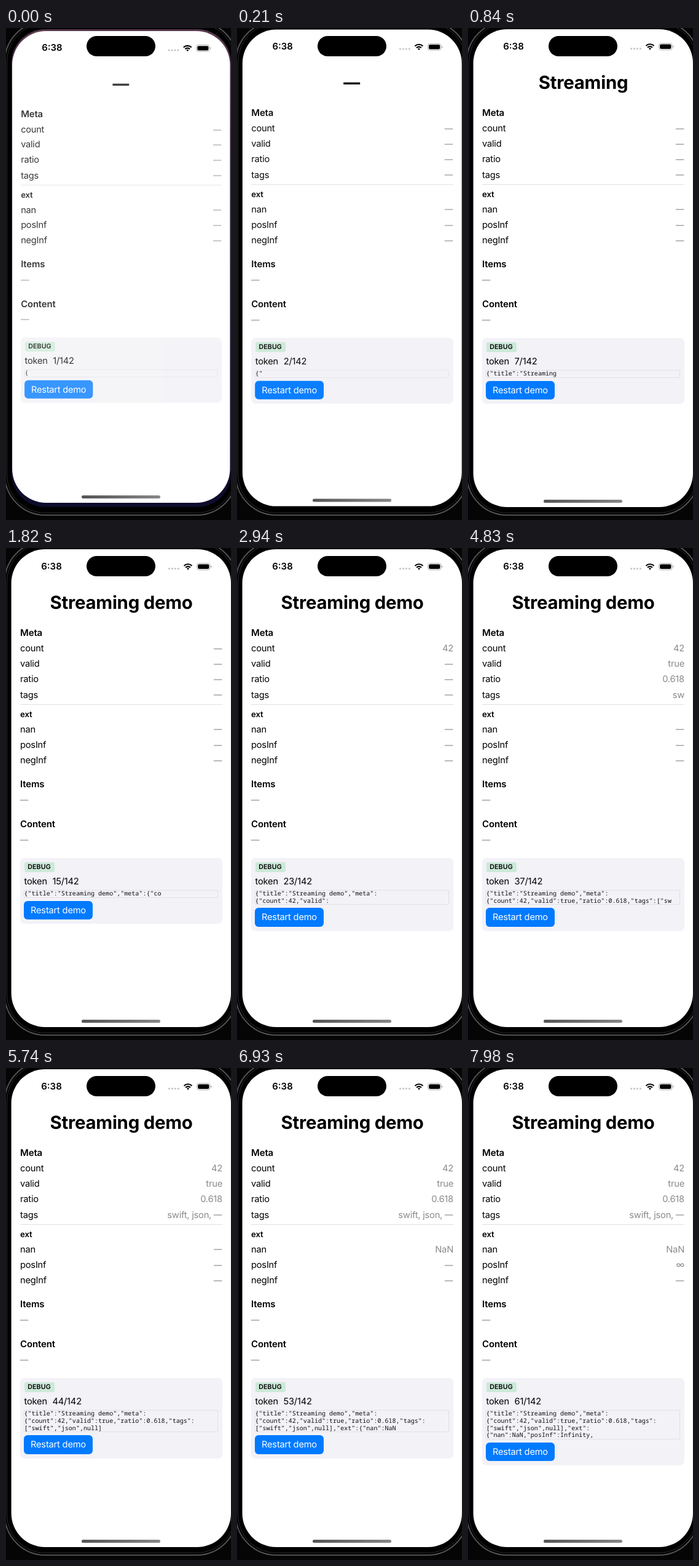
These frames come from a looping animation (366 px wide and 800 px high, 8000 ms). An HTML page:

```html
<!DOCTYPE html>
<html lang="en">
<head>
<meta charset="utf-8">
<title>Streaming demo</title>
<style>
  html, body { margin: 0; width: 100%; height: 100%; overflow: hidden; background: #050505; }
  #stage {
    --k: 1;
    position: relative; width: 366px; height: 800px; overflow: hidden;
    font: 14.7px/20px Inter, Roboto, sans-serif; letter-spacing: -.22px;
    color: #000; white-space: pre; text-rendering: geometricPrecision;
  }
  #stage div { position: absolute; box-sizing: border-box; }
  .body { left: -3px; top: -12px; width: 380px; height: 805px; border-radius: 67px; background: #000; border: 2px solid #505052; }
  .rim { left: 1px; top: -8px; width: 372px; height: 797px; border-radius: 63px; border: 1px solid #2c2c2e; }
  .wall { left: 8.6px; top: 2px; width: 357.3px; height: 777px; border-radius: 55px;
    background: linear-gradient(#5a3a50, #2a2038 30%, #0e0c2c); opacity: var(--k); }
  .win {
    inset: 0; background: #fff;
    clip-path: inset(calc(2px + 3px * var(--k)) calc(.1px + 1.5px * var(--k)) calc(21px + 7px * var(--k)) calc(8.6px + 1.5px * var(--k)) round 55px);
  }
  .zoom { inset: 0; transform-origin: 187px 390px; transform: scale(calc(1 - .007 * var(--k))); }
  .rows { inset: 0; opacity: calc(1 - .22 * var(--k)); }
  .row { left: 23px; width: 329px; height: 20px; display: flex; justify-content: space-between; }
  .row b { font-weight: 600; font-size: 15px; letter-spacing: -.15px; }
  .row b.sub { font-size: 13.2px; letter-spacing: -.1px; }
  .row i { font-style: normal; color: #8a8a8e; }
  .dash { position: relative; top: -.03em; margin-left: -.05em; font-family: "Noto Sans", sans-serif; line-height: 0; letter-spacing: 0; }
  .title { left: 23px; width: 329px; top: 69.6px; text-align: center; font: 700 29.4px/40px Inter, Roboto, sans-serif; letter-spacing: -.25px; }
  .line { left: 23px; width: 329px; top: 254px; height: 1px; background: #e0e0e2; }
  .panel { left: 23px; top: 504px; width: 329px; padding: 52px 7px 7px 6px; background: #f2f2f7; border-radius: 7px; }
  .badge { left: 6.5px; top: 7px; width: 49px; height: 16px; border-radius: 3px; background: #cce9d7;
    font: 600 10.7px/16px Inter, Roboto, sans-serif; letter-spacing: .1px; text-align: center; }
  .token { left: 6.5px; top: 28px; }
  .token span { position: absolute; left: 46px; }
  code { display: block; padding: 0 0 .75px .5px; border-radius: 3px; box-shadow: inset 0 0 0 .8px #dcdce2;
    font: 10.05px/11.75px "Noto Sans Mono", "DejaVu Sans Mono", monospace; letter-spacing: 0; color: #111; }
  .button { display: inline-block; height: 30.5px; margin-top: 5px; padding: 0 11px; border-radius: 6px;
    background: #007aff; color: #fff; line-height: 30.5px; vertical-align: top; }
  .clock { left: 44px; top: 20px; width: 60px; text-align: center; font-weight: 600; font-size: 15px; letter-spacing: 0; }
  svg { position: absolute; left: 0; top: 0; }
  .home { left: 123px; top: 767px; width: 128px; height: 5px; border-radius: 3px;
    background: linear-gradient(90deg, #555, #878787); transform: translateY(calc(-7px * var(--k))); }
  .island { left: 131px; top: 13px; width: 112px; height: 33px; border-radius: 17px; background: #000; }
</style>
</head>
<body>
<div id="stage">
  <div class="body"></div>
  <div class="rim"></div>
  <div class="wall"></div>
  <div class="win">
    <div class="zoom">
      <div class="rows" id="rows">
        <div class="title" id="title"></div>
        <div class="line"></div>
        <div class="panel"><div class="badge">DEBUG</div><div class="token">token<span id="token"></span></div><code id="code"></code><span class="button">Restart demo</span></div>
      </div>
      <div class="clock">6:38</div>
      <svg width="366" height="60" fill="none">
        <g fill="#c8c8ca">
          <circle cx="265.6" cy="33.6" r="1.6"/><circle cx="270.6" cy="33.6" r="1.6"/>
          <circle cx="275.5" cy="33.6" r="1.6"/><circle cx="280.4" cy="33.6" r="1.6"/>
        </g>
        <path d="M289.5 29a9.2 9.2 0 0 1 13 0M292.1 31.7a5.5 5.5 0 0 1 7.8 0" stroke="#000" stroke-width="2.1"/>
        <path d="M296 35.6l-2.1-2.1a3 3 0 0 1 4.2 0z" fill="#000"/>
        <rect x="310.5" y="25" width="21.5" height="10.6" rx="3.2" stroke="#a4a4a6" stroke-width=".9"/>
        <rect x="312.1" y="26.6" width="18.3" height="7.4" rx="2" fill="#000"/>
        <path d="M333.2 28.6q1.4 .6 1.4 1.7t-1.4 1.7z" fill="#a4a4a6"/>
      </svg>
    </div>
    <div class="home"></div>
  </div>
  <div class="island"></div>
</div>
<script>
  const LOOP = 8000, TICK = 70, STEP = 133.1, LEAD = 52, TOTAL = 142, COLS = 52;
  const DASH = '<span class="dash">—</span>';
  const tokens = ('{|"|title|":|"|Stream|ing| demo|",|"|meta|":|{|"|co|unt|":|42|,|"|val|id|":|' +
    'true|,|"|ratio|":|0.|618|,|"|tags|":|[|"|sw|ift|",|"|json|",|null|]|' +
    ',|"|ext|":|{|"|nan|":|NaN|,|"|pos|Inf|":|Inf|inity|,').split('|');

  // y centre, heading or label, value pattern, value format
  const rows = [
    [137.5, '<b>Meta</b>'],
    [163, 'count', /"count":(\d+)/],
    [188, 'valid', /"valid":(true)/],
    [213.3, 'ratio', /"ratio":(\d\.\d+)/],
    [238.5, 'tags', /"tags":\[([^\]]*)/, listTags],
    [270, '<b class="sub">ext</b>'],
    [294.7, 'nan', /"nan":(NaN)/],
    [320, 'posInf', /"posInf":(Infinity)/, () => '∞'],
    [345, 'negInf', /"negInf":(-Infinity)/, () => '-∞'],
    [384, '<b>Items</b>'],
    [409.5, `<i>${DASH}</i>`],
    [449, '<b>Content</b>'],
    [474, `<i>${DASH}</i>`]
  ];

  const $ = id => document.getElementById(id);
  const stage = $('stage');

  const fields = [{ el: $('title'), pattern: /"title":"([^"]+)/, format: s => s }];
  for (const [y, label, pattern, format = s => s] of rows) {
    const row = document.createElement('div');
    row.className = 'row';
    row.style.top = y - 10 + 'px';
    row.innerHTML = `<span>${label}</span>`;
    if (pattern) {
      const el = row.appendChild(document.createElement('i'));
      fields.push({ el, pattern, format });
    }
    $('rows').append(row);
  }

  function listTags(s) {
    return s.replace(/"/g, '').split(',').filter(Boolean)
      .map(tag => tag === 'null' ? DASH : tag).join(', ');
  }

  // Lines may break only between a colon and an opening bracket.
  function wrap(text) {
    const lines = [''];
    for (const part of text.split(/(?<=:)(?=[{[])/)) {
      const last = lines.length - 1;
      if (lines[last] && lines[last].length + part.length > COLS) lines.push(part);
      else lines[last] += part;
    }
    return lines.join('\n');
  }

  let shown = 0;
  function show(n) {
    if (n === shown) return;
    shown = n;
    const text = tokens.slice(0, n).join('');
    $('code').textContent = wrap(text);
    $('token').textContent = n + '/' + TOTAL;
    for (const { el, pattern, format } of fields) {
      const match = text.match(pattern);
      el.innerHTML = match && format(match[1]) || DASH;
    }
  }

  const start = performance.now();
  function draw() {
    const elapsed = (performance.now() - start) % LOOP;
    const t = Math.floor(elapsed / TICK) * TICK;
    const k = Math.exp(-t / 130);
    stage.style.setProperty('--k', k < .01 ? 0 : k.toFixed(3));
    show(Math.min(tokens.length, 1 + Math.floor((t + LEAD) / STEP)));
    requestAnimationFrame(draw);
  }
  draw();
</script>
</body>
</html>
```
